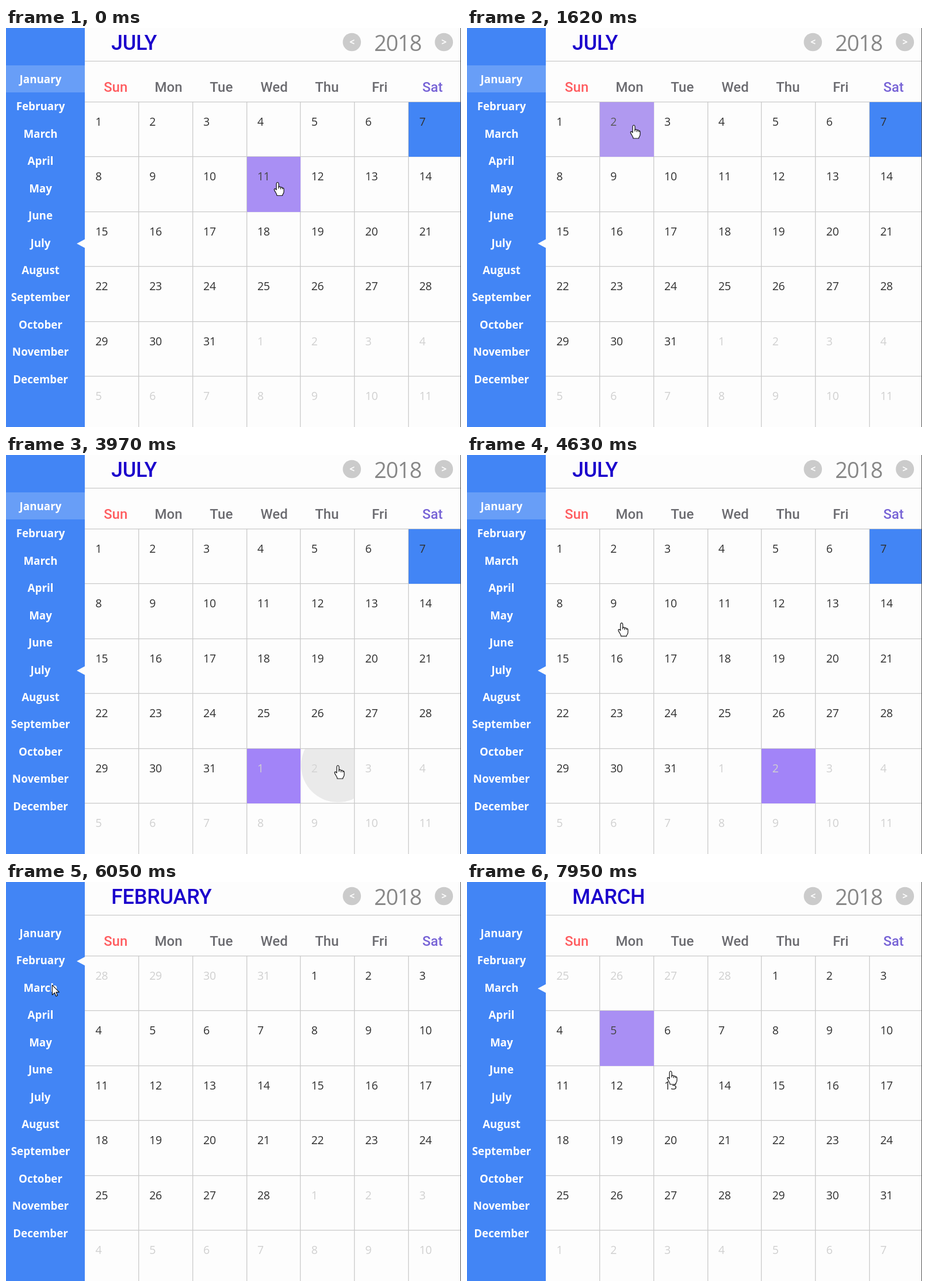
Animation, 791 px wide and 694 px high, one loop 8000 ms. Source, as an HTML page with a canvas:

```html
<!DOCTYPE html>
<html lang="en">
<head>
<meta charset="utf-8">
<title>Calendar</title>
<style>
html, body { margin: 0; width: 100%; height: 100%; overflow: hidden; background: #fdfdfd; }
canvas { display: block; }
</style>
</head>
<body>
<canvas id="stage" width="791" height="694"></canvas>
<script>
const ctx = document.getElementById('stage').getContext('2d');
const LOOP = 8000;
const STEP = 130;
const SIDE = 137;
const YEAR = 2018;
const MONTHS = ['January', 'February', 'March', 'April', 'May', 'June', 'July',
  'August', 'September', 'October', 'November', 'December'];
const WEEK = ['Sun', 'Mon', 'Tue', 'Wed', 'Thu', 'Fri', 'Sat'];
const GOTHIC = 'Roboto, "Liberation Sans", sans-serif';
const HUMANIST = '"Open Sans", "Noto Sans", sans-serif';
const LINE = '#cbcbcb';

const clamp = (v, lo = 0, hi = 1) => Math.min(hi, Math.max(lo, v));
const lineX = c => Math.floor(136.7 + 93.8 * c);
const lineY = r => Math.floor(128.4 + 95.4 * r);
const itemY = m => Math.ceil(65 + 47.45 * m);
const cellAt = (x, y) => [Math.floor((x - 136.7) / 93.8), Math.floor((y - 128.4) / 95.4)];

// The pointer reaches each stop, then clicks after a delay
const stop = (at, x, y, delay) => ({ at, x, y, click: at + delay });
const STOPS = [
  stop(-236, 465, 276, 10),
  stop(410, 582, 152, 230),
  stop(1390, 290, 169, 9),
  stop(2270, 282, 455, 20),
  stop(2870, 495, 526, 80),
  stop(3700, 577, 540, 151),
  stop(4870, 82, 142, 15),
  stop(6070, 80, 190, 100),
  stop(6940, 344, 261, 11),
  stop(7520, 263, 270, 199),
  stop(7940, 354, 329, LOOP)
];
const DAY_CLICKS = STOPS.filter(s => s.x > SIDE);
const MONTH_CLICKS = STOPS.filter(s => s.x < SIDE)
  .map(s => ({ ...s, month: Math.floor((s.y - 65) / 47.45) }));
const VIEWS = [{ at: 0, month: 6 },
  ...MONTH_CLICKS.map(s => ({ at: s.click + 165, month: s.month }))];

const HAND = new Path2D('M-2 3C-2-1 2-1 2 3V8C3 7 5 7 5.5 9C7 8 8.5 8.5 8.7 10' +
  'C10 9.5 11 10 11 12V16C11 20 8.5 20 8.5 23H-1C-1 20-4 17-5.5 13.5C-6.5 11-4 10-2 13Z');
const KNUCKLES = new Path2D('M2 7V11M5.5 8.5V12M8.7 9.5V12');
const ARROW = new Path2D('M0 0V17L4 13.2L6.6 19.3L9.2 18.2L6.6 12.2H12Z');

// The screen updates at a fixed slow rate
const stepped = t => Math.max(0, 15 + STEP * Math.floor((t - 15) / STEP));

function pointer(t) {
  const i = STOPS.findIndex(s => s.at > t);
  if (i < 0) return STOPS[STOPS.length - 1];
  const a = STOPS[i - 1], b = STOPS[i];
  const travel = 300 + 0.8 * Math.hypot(b.x - a.x, b.y - a.y);
  const leave = Math.max(a.click + 180, b.at - travel);
  const k = clamp((t - leave) / (b.at - leave));
  return { x: a.x + (b.x - a.x) * k, y: a.y + (b.y - a.y) * k };
}

function rect(color, x, y, w, h) {
  ctx.fillStyle = color;
  ctx.fillRect(x, y, w, h);
}

function disc(color, x, y, r) {
  ctx.fillStyle = color;
  ctx.beginPath();
  ctx.arc(x, y, r, 0, 7);
  ctx.fill();
}

function text(str, x, y, font, color, align = 'left', spacing = 0) {
  ctx.font = font;
  ctx.fillStyle = color;
  ctx.textAlign = align;
  ctx.letterSpacing = spacing + 'px';
  ctx.fillText(str, x, y);
}

function ripple(color, x, y, r, box) {
  ctx.save();
  ctx.beginPath();
  ctx.rect(...box);
  ctx.clip();
  disc(color, x, y, r);
  ctx.restore();
}

function cellBox(col, row) {
  const x = lineX(col) + 1, y = lineY(row) + 1;
  return [x, y, Math.min(790, lineX(col + 1) + 1) - x, lineY(row + 1) + 1 - y];
}

function drawSidebar(t, month) {
  rect('#4285f5', 0, 0, SIDE, 694);
  if (month === 6) rect('rgba(255,255,255,.2)', 0, itemY(0), SIDE, 47);
  for (const s of MONTH_CLICKS) {
    const age = t - s.click;
    const alpha = 0.3 * clamp((620 - age) / 300);
    if (age > 0) ripple(`rgba(255,255,255,${alpha})`, s.x, s.y, age, [0, itemY(s.month), SIDE, 47]);
  }
  MONTHS.forEach((name, i) =>
    text(name, 60, 95.8 + 47.45 * i, '700 18.8px ' + HUMANIST, '#fff', 'center'));
  const y = 90.3 + 47.45 * month;
  ctx.fillStyle = '#fdfdfd';
  ctx.beginPath();
  ctx.moveTo(123, y);
  ctx.lineTo(SIDE, y - 7.5);
  ctx.lineTo(SIDE, y + 7.5);
  ctx.fill();
}

function drawHeader(month) {
  text(MONTHS[month].toUpperCase(), 183, 37.5, '500 36px ' + GOTHIC, '#1a00cc', 'left', -0.2);
  text(YEAR, 640, 39.5, '38px ' + HUMANIST, '#888', 'left', -1.2);
  [['<', 601], ['>', 761]].forEach(([sign, x]) => {
    disc(LINE, x + 0.3, 24.5, 15.8);
    text(sign, x + 0.5, 30, '700 16px ' + HUMANIST, '#fff', 'center');
  });
  WEEK.forEach((name, i) => {
    const color = i === 0 ? '#ff5c5f' : i === 6 ? '#7763d6' : '#6b6b70';
    text(name, 190.7 + 91.8 * i, 111, '500 24px ' + GOTHIC, color, 'center');
  });
}

function drawGrid() {
  rect(LINE, SIDE, 57, 654, 1.3);
  for (let r = 0; r < 6; r++) rect(LINE, SIDE, lineY(r), 654, 1.3);
  for (let c = 1; c < 7; c++) rect(LINE, lineX(c), 128, 1.3, 566);
}

function drawDays(t, view) {
  if (view.month === 6) rect('#4285f5', ...cellBox(6, 0));
  // A click made before the loop keeps its faint tint
  const clicks = DAY_CLICKS.filter(s => s.click <= t && (!view.at || s.click > view.at))
    .map(s => ({ ...s, age: s.click < 0 ? -s.click : t - s.click, box: cellBox(...cellAt(s.x, s.y)) }));
  const chosen = clicks.filter(c => c.age >= 110).pop();
  if (chosen) rect('#a284f8', ...chosen.box);

  const first = new Date(YEAR, view.month, 1).getDay();
  for (let i = 0; i < 42; i++) {
    const date = new Date(YEAR, view.month, 1 - first + i);
    const color = date.getMonth() === view.month ? '#303030' : '#d0d0d0';
    text(date.getDate(), 155.4 + 93.83 * (i % 7), 170 + 95.4 * Math.floor(i / 7),
      '19.5px ' + HUMANIST, color, 'left', -0.3);
  }

  const last = clicks.pop();
  if (last) {
    const alpha = 0.48 * clamp(1 - (last.age - 80) / 200);
    ripple(`rgba(213,213,213,${alpha})`, last.x, last.y, last.age, last.box);
  }
}

function drawPointer(t) {
  const { x, y } = pointer(t);
  const shape = x > SIDE ? HAND : ARROW;
  ctx.save();
  ctx.translate(x, y);
  ctx.lineJoin = 'round';
  ctx.lineWidth = 1.2;
  ctx.fillStyle = '#fff';
  ctx.strokeStyle = '#111';
  ctx.fill(shape);
  ctx.stroke(shape);
  if (shape === HAND) ctx.stroke(KNUCKLES);
  ctx.restore();
}

function draw(now) {
  const t = stepped(now % LOOP);
  const view = VIEWS.filter(v => v.at <= t).pop();
  rect('#fdfdfd', 0, 0, 791, 694);
  drawGrid();
  drawHeader(view.month);
  drawDays(t, view);
  drawSidebar(t, view.month);
  rect('#555', 790, 0, 1, 694);
  drawPointer(t);
}

const start = performance.now();
function tick() {
  draw(performance.now() - start);
  requestAnimationFrame(tick);
}
tick();
</script>
</body>
</html>
```
